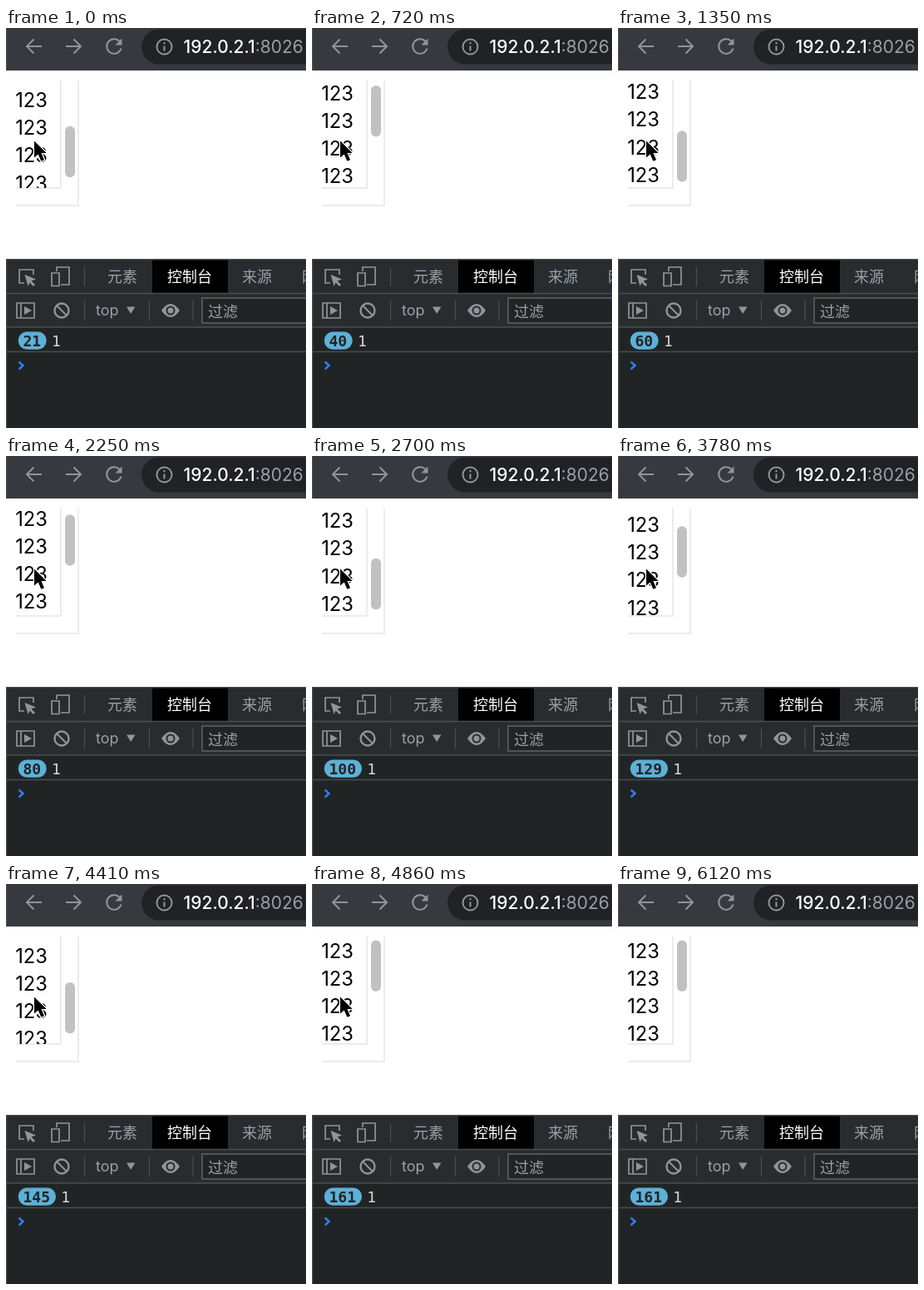
An HTML page that plays this animation: 361x480 px, repeating every 6.93 s.

```html
<!DOCTYPE html>
<html lang="zh-CN">
<head>
<meta charset="utf-8">
<title>Scroll counter</title>
<style>
  html, body { margin: 0; width: 100%; height: 100%; overflow: hidden; background: #fff; }
  svg { display: block; width: 100vw; height: 100vh; }
  text { white-space: pre; }
  .url { font: 500 21px Inter, sans-serif; fill: #fff; }
  .url tspan { font-weight: 400; fill: #9aa0a6; }
  .item { font: 23.7px Inter, sans-serif; fill: #000; }
  .ui { font: 18px "Noto Sans CJK SC", "Noto Sans CJK", sans-serif; fill: #9aa0a6; }
  .ui .on { fill: #fff; }
  .ui .latin { font: 18px Inter, sans-serif; }
  .mono { font: 18px "DejaVu Sans Mono", monospace; fill: #d5d7da; }
  .mono.count { font-weight: bold; fill: #212425; }
  .icon { fill: none; stroke: #919599; stroke-width: 2; }
  .icon .solid { fill: #919599; stroke: none; }
  .thin { stroke-width: 1.7; }
  .sep { fill: none; stroke: #4a4d50; stroke-width: 1.3; }
</style>
</head>
<body>
<svg viewBox="0 0 361 480">
  <defs>
    <clipPath id="view"><rect x="11" y="63" width="55" height="129"/></clipPath>
  </defs>
  <rect width="361" height="480" fill="#fff"/>

  <!-- browser bar -->
  <rect width="361" height="51" fill="#36393d"/>
  <rect x="163" y="1.5" width="240" height="42" rx="21" fill="#202225"/>
  <g class="icon">
    <path d="M43 22H25M33.5 13.5L25 22l8.5 8.5"/>
    <path d="M72 22H90M81.5 13.5L90 22l-8.5 8.5"/>
    <path d="M136.5 16A8.8 8.8 0 1 0 138.5 24.5"/>
    <path class="solid" d="M139.5 12.5V20.5H131.5Z"/>
    <circle cx="190.5" cy="22.5" r="9"/>
    <path d="M190.5 21.5V27.5M190.5 17V19.2"/>
  </g>
  <text class="url" x="213.5" y="30.2">192.0.2.1<tspan>:8026</tspan></text>

  <!-- scroll box -->
  <path d="M66 63V192H12M87 63V213H12" fill="none" stroke="#e6e6e6" stroke-width="1.5"/>
  <g clip-path="url(#view)"><g id="list"></g></g>
  <rect id="thumb" x="71" width="12" height="61.5" rx="6" fill="#c1c1c1"/>

  <!-- developer tools -->
  <rect y="277" width="361" height="82" fill="#292c2e"/>
  <rect y="359" width="361" height="121" fill="#212425"/>
  <rect x="176" y="278.5" width="91" height="39.5" fill="#000"/>
  <path class="sep" d="M0 277.6H361M0 318.5H361M0 359H361M0 388.5H361M94.5 287V310M94.5 327V351M172.5 327V351M225 327V351"/>
  <path class="sep" d="M.5 0V51M.5 277V480"/>
  <g class="icon">
    <g class="thin">
      <path d="M22 306H16V290H33V296"/>
      <path class="solid" d="M22.5 296L36 301.5L30.5 303.5L35 308L33 310L28.5 305.5L26.5 310Z"/>
      <path d="M61 292V287H76V308H66M55 294H64V309.500H55Z"/>
      <path d="M13 330H34V348H13ZM18 330V348"/>
      <path class="solid" d="M22 334L31 339L22 344Z"/>
    </g>
    <circle cx="67" cy="339" r="8.5" stroke-width="2.4"/>
    <path d="M61 333L73 345"/>
    <path class="solid" d="M187 339Q198 323 209 339Q198 355 187 339Z"/>
    <circle cx="198" cy="339" r="4.5" fill="#919599" style="stroke:#292c2e"/>
    <path class="solid" d="M145 334.5H155.500L150.200 343Z"/>
  </g>
  <g class="ui">
    <text x="122" y="304.5">元素</text>
    <text class="on" x="194" y="304.5">控制台</text>
    <text x="284" y="304.5">来源</text>
    <text x="356" y="304.5">网络</text>
    <text class="latin" x="108" y="345">top</text>
  </g>
  <rect x="236" y="324" width="140" height="30" fill="#212425" stroke="#5f6368" stroke-width="1.5"/>
  <text class="ui" x="243" y="346.5">过滤</text>

  <!-- console -->
  <rect id="badge" x="14.8" y="364.5" height="21.3" rx="10.6" fill="#5db0d7"/>
  <text id="count" class="mono count" x="20.5" y="382"></text>
  <text id="msg" class="mono" y="382">1</text>
  <path d="M15.5 400.5L20.5 405L15.5 409.5" fill="none" stroke="#367cf1" stroke-width="2.4"/>

  <path id="cursor" d="M0 0V20L4.700 16L8.300 24.300L12 22.700L8.400 14.600H14.600Z" fill="#000" stroke="#fff" stroke-width="2.400" paint-order="stroke"/>
</svg>
<script>
  const LOOP = 6930, TICK = 90, LINE = 33.1, LINES = 7, MAX = 103.5;
  const $ = id => document.getElementById(id);

  // start tick, steps, easing lead, first count, last count, end scroll
  const swipes = [
    [0, 5, 0.98, 21, 39, 0],
    [8, 5, 0.4, 40, 59, MAX],
    [15, 5, 0.17, 60, 79, 0],
    [25, 6, 0.78, 80, 100, 102],
    [32, 5, 0.4, 101, 120, 0],
    [40, 6, -0.3, 121, 141, MAX],
    [48, 7, 0.2, 142, 161, 0]
  ];
  const exitTick = 56;
  const exitPath = [[42, 152], [88, 230], [176, 352], [262, 456]];

  const smooth = x => x * x * (3 - 2 * x);

  function scrollAt(tick) {
    let from = MAX, pos = MAX, count = 21;
    for (const [start, steps, lead, c0, c1, to] of swipes) {
      if (tick < start) break;
      const last = steps - 1, i = Math.min(tick - start, last);
      const p = smooth(Math.max(0, (i + lead) / (last + lead)));
      pos = from + (to - from) * p;
      count = Math.round(c0 + (c1 - c0) * i / last);
      from = to;
    }
    return { pos, count };
  }

  for (let i = 0; i < LINES; i++) {
    const t = document.createElementNS("http://www.w3.org/2000/svg", "text");
    t.setAttribute("class", "item");
    t.setAttribute("x", 11.2);
    t.setAttribute("y", 89 + i * LINE);
    t.textContent = "123";
    $("list").append(t);
  }

  function draw(tick) {
    const { pos, count } = scrollAt(tick);
    const wide = count > 99 ? 11.3 : 0;
    $("list").setAttribute("transform", `translate(0 ${-pos})`);
    $("thumb").setAttribute("y", 67.6 + pos * 0.54);
    $("count").textContent = count;
    $("badge").setAttribute("width", 33.9 + wide);
    $("msg").setAttribute("x", 55 + wide);

    const [x, y] = tick < exitTick ? [34, 135.5] : exitPath[tick - exitTick] || [300, 520];
    $("cursor").setAttribute("transform", `translate(${x} ${y})`);
  }

  const begin = performance.now();
  function frame() {
    draw(Math.floor((performance.now() - begin) % LOOP / TICK));
    requestAnimationFrame(frame);
  }
  frame();
</script>
</body>
</html>
```
